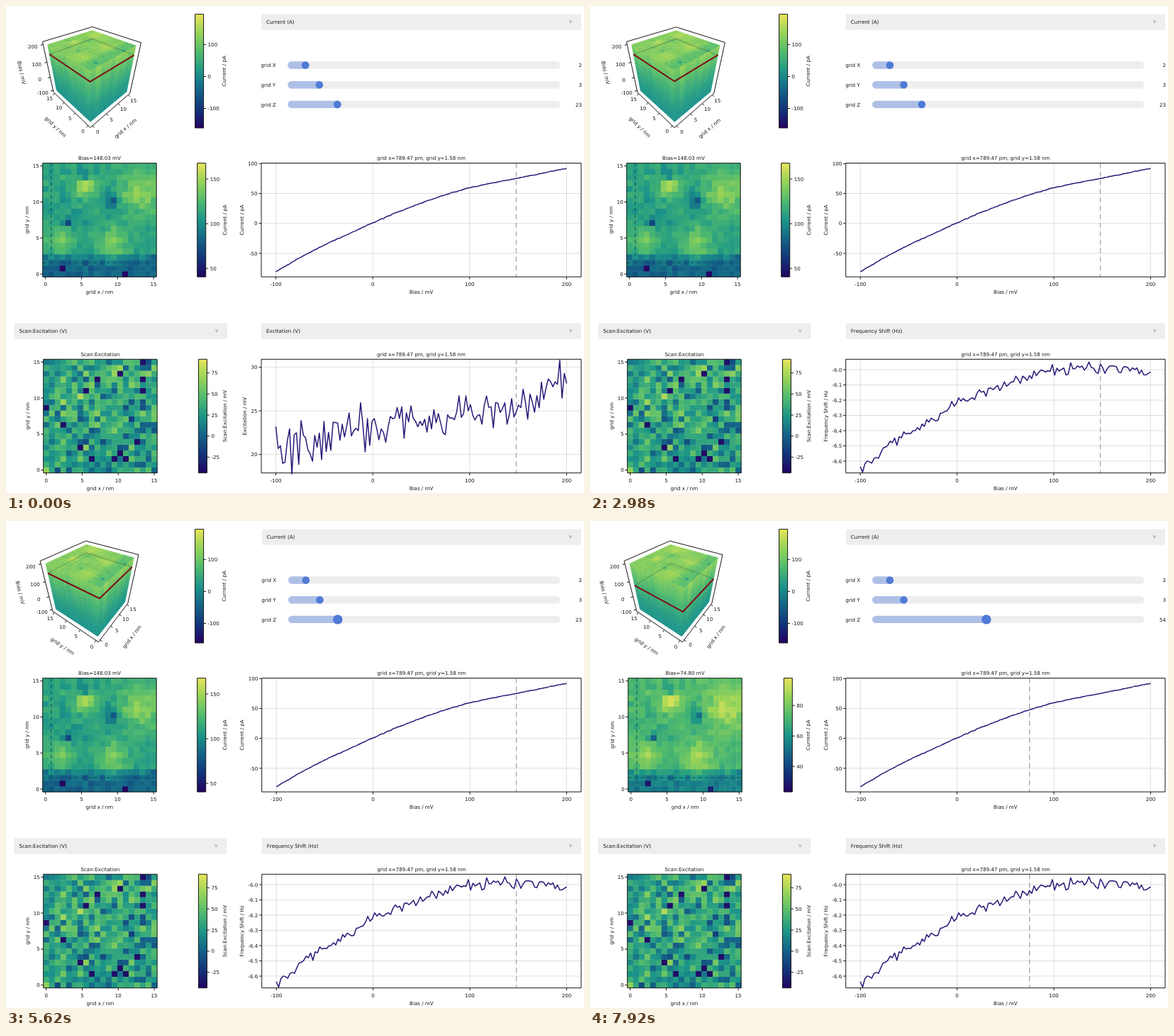
Write an HTML page with a canvas that moves like this. It is 815 px wide and 687 px high and loops after 8000 ms.

```html
<!DOCTYPE html>
<html lang="en">
<head>
<meta charset="utf-8">
<title>Grid viewer</title>
<style>
html, body { margin: 0; width: 815px; height: 687px; overflow: hidden; background: #fff; }
canvas { display: block; }
</style>
</head>
<body>
<canvas id="stage" width="815" height="687"></canvas>
<script>
const ctx = document.getElementById('stage').getContext('2d');
const LOOP = 8000, STEPS = 128, CELLS = 20, SIZE = 160.4;
const UPPER = 221.7, LOWER = 498.3;
const INK = '#161616', NAVY = '#261a78', GREY = '#eeeeee', ACCENT = '#4f7ad6', DIM = '#aec0e6';
const RAMP = [[36, 2, 98], [18, 52, 122], [20, 100, 135], [28, 150, 136], [80, 186, 110], [150, 211, 88], [232, 228, 90]];
const OPTIONS = ['Current (A)', 'Applied Voltage measured (V)', 'Bias (V)', 'X (m)', 'Y (m)', 'Z (m)',
  'Phase (deg)', 'Amplitude (m)', 'Frequency Shift (Hz)', 'Excitation (V)'];

const lerp = (a, b, p) => a + (b - a) * p;
const clamp = v => Math.max(0, Math.min(1, v));
const noise = n => { const v = Math.sin(n * 12.9898 + 4.1) * 43758.5453; return v - Math.floor(v); };
const bell = n => noise(n) + noise(n + 500) + noise(n + 1000) - 1.5;
const range = (from, to, step) => Array.from({ length: Math.round((to - from) / step) + 1 }, (_, i) => from + i * step);
const biasOf = k => 200 - 300 * (k - 1) / (STEPS - 1);

function ramp(t) {
  const p = clamp(t) * (RAMP.length - 1), i = Math.min(RAMP.length - 2, Math.floor(p));
  return `rgb(${RAMP[i].map((c, n) => Math.round(lerp(c, RAMP[i + 1][n], p - i)))})`;
}
function knots(points, x) {
  let i = 0;
  while (i < points.length - 2 && x > points[i + 1][0]) i++;
  const [a, b] = [points[i], points[i + 1]];
  return lerp(a[1], b[1], clamp((x - a[0]) / (b[0] - a[0])));
}
function text(s, x, y, align = 'center', angle = 0) {
  ctx.save();
  ctx.translate(x, y);
  ctx.rotate(angle);
  ctx.font = '7.1px "DejaVu Sans", sans-serif';
  ctx.textRendering = 'geometricPrecision';
  ctx.fontKerning = 'none';
  ctx.textAlign = align;
  ctx.fillStyle = INK;
  ctx.fillText(s, 0, 2.6);
  ctx.restore();
}
function path(points, color, width = 1, dash = []) {
  ctx.beginPath();
  points.forEach(p => ctx.lineTo(p[0], p[1]));
  ctx.strokeStyle = color;
  ctx.lineWidth = width;
  ctx.lineJoin = 'round';
  ctx.setLineDash(dash);
  ctx.stroke();
  ctx.setLineDash([]);
}
function rect(x, y, w, h, color) {
  ctx.fillStyle = color;
  ctx.fillRect(x, y, w, h);
}
function frame(x, y, w, h) {
  ctx.strokeStyle = INK;
  ctx.lineWidth = 1;
  ctx.strokeRect(x, y, w, h);
}

function menu(label, x, right, y, fill = GREY, open = false) {
  rect(x, y, right - x, 22.4, fill);
  text(label, x + 7, y + 11.2, 'left');
  const cx = right - 15, cy = y + 11.2, d = open ? -1 : 1;
  ctx.beginPath();
  ctx.moveTo(cx - 2.4, cy - 2.2 * d);
  ctx.lineTo(cx + 2.4, cy - 2.2 * d);
  ctx.lineTo(cx, cy + 2.4 * d);
  ctx.fillStyle = open ? '#8e9fc6' : '#bcbcbc';
  ctx.fill();
}
function slider(label, y, value, count, x0, big) {
  const left = x0 + 37.3, right = 781.5, r = 5.2;
  const hx = lerp(left + r, right - r, (value - 1) / (count - 1));
  const bar = (end, color) => {
    ctx.beginPath();
    ctx.roundRect(left, y - r, end - left, 2 * r, r);
    ctx.fillStyle = color;
    ctx.fill();
  };
  bar(right, GREY);
  bar(hx + r, DIM);
  ctx.beginPath();
  ctx.arc(hx, y, big ? 6.7 : 5.3, 0, 7);
  ctx.fillStyle = ACCENT;
  ctx.fill();
  text(label, x0 - 0.5, y, 'left');
  text(value, 812, y, 'right');
}
function colorbar(x, y, low, high, step, label, labelX) {
  const g = ctx.createLinearGradient(0, y + SIZE, 0, y);
  for (let i = 0; i <= 12; i++) g.addColorStop(i / 12, ramp(i / 12));
  rect(x, y, 12, SIZE, g);
  frame(x, y, 12, SIZE);
  for (let v = Math.ceil(low / step) * step; v <= high; v += step) {
    const ty = y + SIZE * (high - v) / (high - low);
    path([[x + 12, ty], [x + 15.5, ty]], INK);
    text(v, x + 18, ty, 'left');
  }
  text(label, labelX, y + SIZE / 2, 'center', -Math.PI / 2);
}

// Soft spots of the current map: column and row from the lower left, radius, strength.
const SPOTS = [[2.6, 6, 1.8, .2], [11.8, 5.6, 2.1, .22], [7, 15.6, 1.3, .34], [16.8, 14.5, 3, .25],
  [6.6, 17.4, .6, -.3], [11.6, 12.8, 1, -.24], [4, 9, .6, -.26], [3, 1, .4, -.4], [14, 0, .4, -.32]];
const map = shade => Array.from({ length: CELLS * CELLS }, (_, n) => shade(n % CELLS, Math.floor(n / CELLS), n));
const CURRENT = map((i, j, n) => SPOTS.reduce(
  (t, [x, y, r, a]) => t + a * Math.exp(-((i - x) ** 2 + (j - y) ** 2) / (2 * r * r)),
  (j < 3 ? .34 : j < 4 ? .4 : .54) + bell(n) * .07));
const SCAN = map((i, j, n) => noise(n + 9) > .965 ? .04 : .54 + bell(n + 77) * .25);

function heatmap(x, y, cells, lift, title) {
  const c = SIZE / CELLS, bottom = y + SIZE;
  cells.forEach((t, n) => rect(x + n % CELLS * c, bottom - (Math.floor(n / CELLS) + 1) * c, c + .3, c + .3, ramp(t + lift)));
  frame(x, y, SIZE, SIZE);
  for (let v = 0; v <= 15; v += 5) {
    const d = (v / 15 * (CELLS - 1) + .5) * c;
    path([[x + d, bottom], [x + d, bottom + 3.5]], INK);
    path([[x, bottom - d], [x - 3.5, bottom - d]], INK);
    text(v, x + d, bottom + 10.3);
    text(v, x - 5, bottom - d, 'right');
  }
  text('grid x / nm', x + SIZE / 2, bottom + 21.2);
  text('grid y / nm', x - 22, y + SIZE / 2, 'center', -Math.PI / 2);
  text(title, x + SIZE / 2, y - 7.3);
}

function sweep(x0, y, ticks, yOf, digits, label, labelX, curve, bias) {
  const w = 811 - x0, bottom = y + SIZE;
  const xOf = b => x0 + w * (b + 115) / 330;
  const xs = range(-100, 200, 100);
  for (const b of xs) path([[xOf(b), y], [xOf(b), bottom]], 'rgba(0,0,0,.13)');
  for (const v of ticks) path([[x0, yOf(v)], [811, yOf(v)]], 'rgba(0,0,0,.13)');
  path([[xOf(bias), y], [xOf(bias), bottom]], '#a9a9a9', 1.4, [7, 5]);
  path(curve.map((v, i) => [xOf(-100 + 300 * i / (STEPS - 1)), yOf(v)]), NAVY, 1.5);
  frame(x0, y, w, SIZE);
  for (const b of xs) {
    path([[xOf(b), bottom], [xOf(b), bottom + 3.5]], INK);
    text(b, xOf(b), bottom + 10.3);
  }
  for (const v of ticks) {
    path([[x0 - 3.5, yOf(v)], [x0, yOf(v)]], INK);
    text(v.toFixed(digits), x0 - 5.5, yOf(v), 'right');
  }
  text('Bias / mV', (x0 + 811) / 2, bottom + 21.2);
  text(label, labelX, y + SIZE / 2, 'center', -Math.PI / 2);
  text('grid x=789.47 pm, grid y=1.58 nm', (x0 + 811) / 2, y - 7.3);
}

// Each curve is a trend over the bias plus seeded scatter.
const curve = (trend, scatter, seed) => Array.from({ length: STEPS },
  (_, n) => knots(trend, -100 + 300 * n / (STEPS - 1)) + bell(n + seed) * scatter);
const CURRENT_CURVE = curve([[-100, -80.5], [-75, -57], [-50, -36], [0, 1], [25, 18.5], [50, 34], [75, 48],
  [100, 60], [150, 76], [200, 92]], .6, 0);
const EXCITATION_CURVE = curve([[-100, 20.5], [-60, 21], [-20, 23], [50, 24.3], [120, 25], [160, 26], [200, 28.6]], 2.5, 40);
const FREQUENCY_CURVE = curve([[-100, -6.65], [-80, -6.54], [-50, -6.41], [0, -6.22], [50, -6.09], [80, -6.03],
  [125, -5.98], [160, -5.98], [200, -6.02]], .04, 80);

// Perspective view of the box, every axis running from -1 to 1.
function camera(turn, tilt) {
  const az = Math.PI * 1.25 + turn, el = tilt * Math.PI / 180;
  const sa = Math.sin(az), ca = Math.cos(az), s = Math.sin(el), c = Math.cos(el);
  return (x, y, z) => {
    const along = ca * x + sa * y, k = 193 / (4.5 - c * along - s * z);
    return [120.5 + k * (ca * y - sa * x), 91.3 - k * (c * z - s * along)];
  };
}
function surface(nv, at, shade) {
  const E = 1 / 1.1, e = (i, n) => lerp(-E, E, i / n);
  for (let i = 0; i < CELLS; i++) for (let j = 0; j < nv; j++) {
    const [u0, u1, v0, v1] = [e(i, CELLS), e(i + 1, CELLS), e(j, nv), e(j + 1, nv)];
    ctx.beginPath();
    for (const p of [at(u0, v0), at(u1, v0), at(u1, v1), at(u0, v1)]) ctx.lineTo(...p);
    ctx.closePath();
    ctx.fillStyle = ctx.strokeStyle = ramp(shade(i, j));
    ctx.lineWidth = .5;
    ctx.fill();
    ctx.stroke();
  }
}
function cube(turn, tilt, bias) {
  const P = camera(turn, tilt), E = 1 / 1.1;
  const zOf = b => (b - 50) / 165, nmOf = v => (v - 7.5) / 8.25;
  const layers = 24, faint = 'rgba(0,70,70,.14)';
  const wall = seed => (i, j) => {
    const h = (j + .5) / layers;
    return .49 + .31 * h ** 1.7 + bell(Math.floor(i / 2) + seed) * .05 * h;
  };
  path([P(-1, 1, 1), P(1, 1, 1), P(1, -1, 1)], INK);
  surface(layers, (u, v) => P(-E, u, v), wall(30));
  surface(layers, (u, v) => P(u, -E, v), wall(60));
  surface(CELLS, (u, v) => P(u, v, E), (i, j) => .78 + (CURRENT[j * CELLS + i] - .54) * .4);
  for (const v of [5, 10].map(nmOf)) {
    path([P(-E, v, -E), P(-E, v, E), P(E, v, E)], faint, .7);
    path([P(v, -E, -E), P(v, -E, E), P(v, E, E)], faint, .7);
  }
  for (const z of [0, 100].map(zOf)) path([P(-E, E, z), P(-E, -E, z), P(E, -E, z)], faint, .7);

  path([P(-1, 1, 1), P(-1, 1, -1), P(-1, -1, -1), P(1, -1, -1), P(1, -1, 1)], INK);
  const z = zOf(bias);
  path([P(-E, E, z), P(E, E, z), P(E, -E, z)], 'rgba(40,40,30,.85)', .8, [1.2, 1.2]);
  path([P(-E, E, z), P(-E, -E, z), P(E, -E, z)], '#7d1018', 2);

  const axis = (from, to, at, values, label, gap, labelGap) => {
    const a = P(...from), b = P(...to), dx = b[0] - a[0], dy = b[1] - a[1], len = Math.hypot(dx, dy);
    const out = (p, d) => [p[0] - dy / len * d, p[1] + dx / len * d];
    for (const v of values) {
      const p = at(v);
      path([p, out(p, 3.5)], INK);
      text(v, ...out(p, gap));
    }
    text(label, ...out([(a[0] + b[0]) / 2, (a[1] + b[1]) / 2], labelGap), 'center', Math.atan2(dy, dx));
  };
  const nm = range(0, 15, 5);
  axis([-1, 1, 1], [-1, 1, -1], b => P(-1, 1, zOf(b)), range(-100, 200, 100), 'Bias / mV', 15, 38);
  axis([-1, 1, -1], [-1, -1, -1], v => P(-1, nmOf(v), -1), nm, 'grid y / nm', 10.5, 33);
  axis([-1, -1, -1], [1, -1, -1], v => P(nmOf(v), -1, -1), nm, 'grid x / nm', 11, 33);
}

// Orbit drags: start, end, step count, resting turn and tilt.
const DRAGS = [[2980, 3720, 10, -.13, 21], [3850, 4340, 8, 0, 40.5], [4540, 4820, 5, -.145, 37]];
function orbit(t) {
  let turn = .024, tilt = 35;
  for (const [start, end, steps, toTurn, toTilt] of DRAGS) {
    if (t < start) break;
    const n = Math.min(steps, Math.floor((t - start) / (end - start) * (steps - 1) + 1e-6) + 1);
    const p = n / steps, e = p * p * (3 - 2 * p);
    turn = lerp(turn, toTurn, e);
    tilt = lerp(tilt, toTilt, e);
  }
  return [turn, tilt];
}
function slice(t) {
  if (t < 6940) return t < 6680 ? 23 : 24;
  return Math.min(54, Math.floor(26.8 + 2.12 * Math.floor((t - 6940) / 70)));
}

function dropdown(t, x0) {
  const y = 223.4, h = 22.4;
  OPTIONS.forEach((name, i) => {
    const hover = i === 8 && t >= 1200;
    rect(x0, y + i * h, 811 - x0, h + .2, i === 9 ? ACCENT : hover ? DIM : '#f7f7f7');
    text(name, x0 + 7, y + (i + .5) * h, 'left');
  });
}

function draw(t) {
  rect(0, 0, 815, 687, '#fff');
  const changed = t >= 1860, x0 = changed ? 360.7 : 360;
  const k = slice(t), bias = biasOf(k);
  const high = knots([[23, 167.7], [31, 153.4], [54, 98]], k);
  const low = knots([[23, 40.5], [31, 37], [54, 23.3]], k);
  const span = high - low, narrow = high < 100;

  cube(...orbit(t), bias);
  colorbar(266.6, 11.6, -161, 195, 100, 'Current / pA', 307.5);

  menu('Current (A)', x0, 811, 11.4);
  slider('grid X', 83.5, 2, CELLS, x0, false);
  slider('grid Y', 111.2, 3, CELLS, x0, t >= 5480 && t < 5550);
  slider('grid Z', 138.9, k, STEPS, x0, t >= 5620);

  const hx = narrow ? 53.8 : 51.7, cell = SIZE / CELLS;
  const cutX = hx + 1.5 * cell, cutY = UPPER + 17.5 * cell, cutColor = 'rgba(14,72,100,.8)';
  heatmap(hx, UPPER, CURRENT, (k - 23) / 31 * .09, `Bias=${bias.toFixed(2)} mV`);
  path([[cutX, UPPER], [cutX, UPPER + SIZE]], cutColor, 1.2, [5, 4]);
  path([[hx, cutY], [hx + SIZE, cutY]], cutColor, 1.2, [5, 4]);
  colorbar(narrow ? 273.3 : 269.7, UPPER, low, high, span > 100 ? 50 : span > 80 ? 25 : 20,
    'Current / pA', narrow ? 307.5 : 308.8);
  sweep(x0, UPPER, range(-50, 100, 50), v => 306.7 - v * .844, 0, 'Current / pA', 332, CURRENT_CURVE, bias);

  menu('Scan:Excitation (V)', 11.4, changed ? 311.4 : 312, 447.4);
  heatmap(52.7, LOWER, SCAN, 0, 'Scan:Excitation');
  colorbar(271.4, LOWER, -43.5, 91, 25, 'Scan:Excitation / mV', 308);

  if (changed) {
    sweep(x0, LOWER, range(-6.6, -6, .1), v => 513 - (v + 6) * 215, 1,
      'Frequency Shift / Hz', 332.5, FREQUENCY_CURVE, bias);
    menu('Frequency Shift (Hz)', x0, 811, 447.4);
  } else {
    sweep(x0, LOWER, range(20, 30, 5), v => 509.6 + (30 - v) * 12.3, 0,
      'Excitation / mV', 336.8, EXCITATION_CURVE, bias);
    const open = t >= 270;
    const fill = t < 200 ? GREY : t < 270 ? DIM : t < 670 ? ACCENT : t < 800 ? DIM : GREY;
    menu('Excitation (V)', x0, 811, 447.4, fill, open);
    if (open) dropdown(t, x0);
  }
}

const begin = performance.now();
function tick() {
  draw((performance.now() - begin) % LOOP);
  requestAnimationFrame(tick);
}
tick();
</script>
</body>
</html>
```
